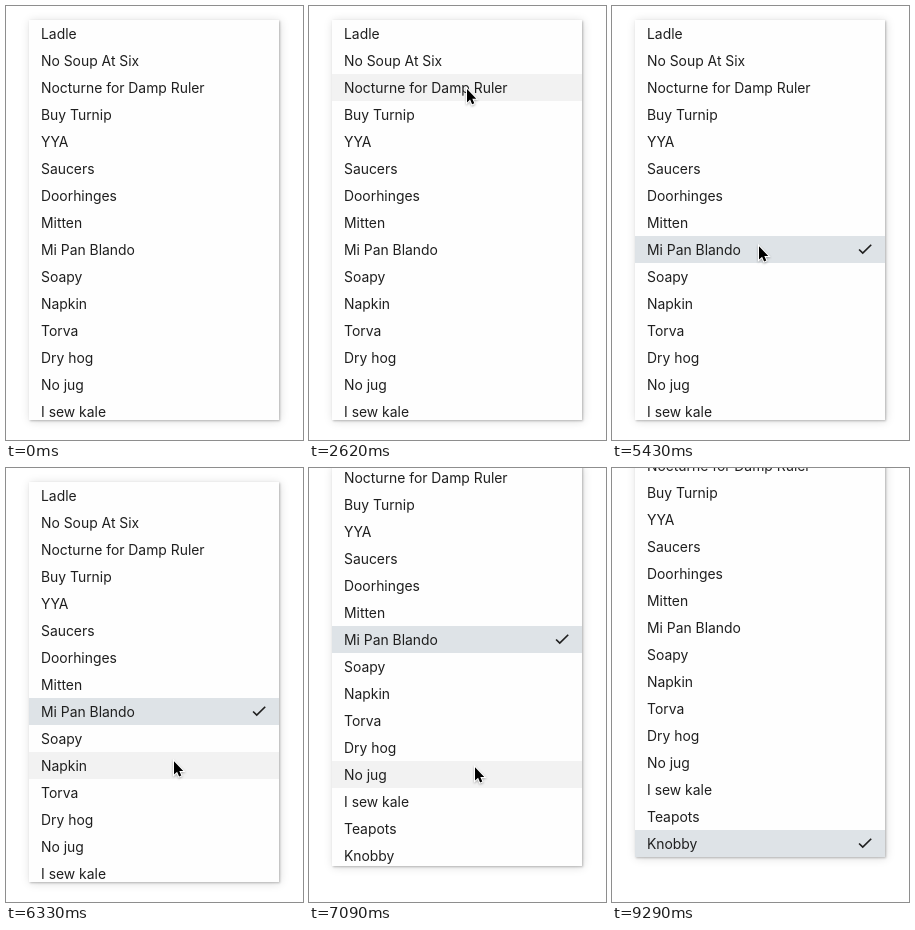
Write an HTML page that moves like this. It is 297 px wide and 434 px high and loops after 9930 ms.

```html
<!DOCTYPE html>
<html lang="en">
<head>
<meta charset="utf-8">
<title>Song list</title>
<style>
  html, body { margin: 0; width: 100%; height: 100%; overflow: hidden; background: #fff; }
  #card {
    position: absolute; left: 23px; top: 14px; width: 250px; height: 400px;
    overflow: hidden; background: #fefefe;
    box-shadow: 1px 1px 2px rgba(0, 0, 0, .24), 1px 1px 9px rgba(0, 0, 0, .15);
  }
  .row {
    position: relative; height: 27px; padding-left: 12px; white-space: nowrap;
    font: 13.9px/29px Inter, Roboto, sans-serif; color: #1f1f1f;
  }
  .hover { background: #f2f2f2; }
  .selected { background: #dee3e7; }
  .row svg { position: absolute; left: 220.5px; top: 4px; display: none; }
  .selected svg { display: block; }
  #cursor {
    position: absolute; left: 0; top: 0; overflow: visible;
    filter: drop-shadow(0 1px 1px rgba(0, 0, 0, .3));
  }
</style>
</head>
<body>
<div id="card"><div id="list"></div></div>
<svg id="cursor" width="12" height="19">
  <path d="M1 1.3V14.6L4.1 11.8L6.1 16.5L8.3 15.5L6.3 11H10.3Z"
        fill="#000" stroke="#fff" stroke-width="2" paint-order="stroke"/>
</svg>
<script>
const LOOP = 9930, ROW = 27, TOP = 14;
const titles = ["Ladle", "No Soup At Six", "Nocturne for Damp Ruler", "Buy Turnip", "YYA",
  "Saucers", "Doorhinges", "Mitten", "Mi Pan Blando", "Soapy", "Napkin", "Torva",
  "Dry hog", "No jug", "I sew kale", "Teapots", "Knobby"];

const linear = p => p;
const easeIn = p => p * p;
const easeOut = p => p * (2 - p);
const smooth = p => p * p * (3 - 2 * p);

// Each move: start ms, end ms, end values, easing.
const cursorStart = [188, 371];
const cursorMoves = [
  [480, 900, [155, 76], smooth],
  [1630, 2080, [157, 25], smooth],
  [2440, 3100, [157, 145], easeOut],
  [3800, 4300, [154, 202.4], easeIn],
  [4300, 4530, [149.5, 222], easeOut],
  [4910, 5200, [146, 239], smooth],
  [5610, 5970, [167, 292], smooth],
  [6650, 7090, [165, 298], smooth],
  [7560, 8130, [142, 371], smooth],
  [9140, 9290, [262, 445], linear]
];
// Values: list scroll, page scroll.
const scrollMoves = [
  [6300, 6930, [56, 0], smooth],
  [6880, 7090, [56, 16], smooth],
  [7430, 7800, [59, 25], smooth]
];
const clicks = [[3520, 4], [5430, 8], [9000, 16]];

function follow(start, moves, t) {
  let now = start;
  for (const [t0, t1, end, ease] of moves) {
    if (t <= t0) break;
    const p = ease(Math.min(1, (t - t0) / (t1 - t0)));
    now = now.map((v, i) => v + (end[i] - v) * p);
  }
  return now;
}

const card = document.getElementById("card");
const list = document.getElementById("list");
const cursor = document.getElementById("cursor");

const rows = titles.map(title => {
  const row = document.createElement("div");
  row.innerHTML = title + `<svg width="18" height="18" viewBox="0 0 24 24">
    <path d="M4.1 12.7L9 17.6L20.3 6.3" fill="none" stroke="#1f1f1f" stroke-width="2.2"/></svg>`;
  list.append(row);
  return row;
});

function draw(t) {
  const [x, y] = follow(cursorStart, cursorMoves, t);
  const [inner, page] = follow([0, 0], scrollMoves, t).map(Math.round);
  const shown = t >= 480 && t < 9290;
  const bottom = TOP + 400 - page;
  const hovered = shown && y < bottom ? Math.floor((y - TOP + inner + page) / ROW) : -1;
  let selected = -1;
  for (const [time, row] of clicks) if (t >= time) selected = row;

  rows.forEach((row, i) => {
    row.className = "row" + (i === selected ? " selected" : i === hovered ? " hover" : "");
  });
  card.style.transform = `translateY(${-page}px)`;
  list.style.transform = `translateY(${-inner}px)`;
  cursor.style.display = shown ? "block" : "none";
  cursor.style.transform = `translate(${x}px, ${y}px)`;
}

const begin = performance.now();
function tick() {
  draw((performance.now() - begin) % LOOP);
  requestAnimationFrame(tick);
}
tick();
</script>
</body>
</html>
```
